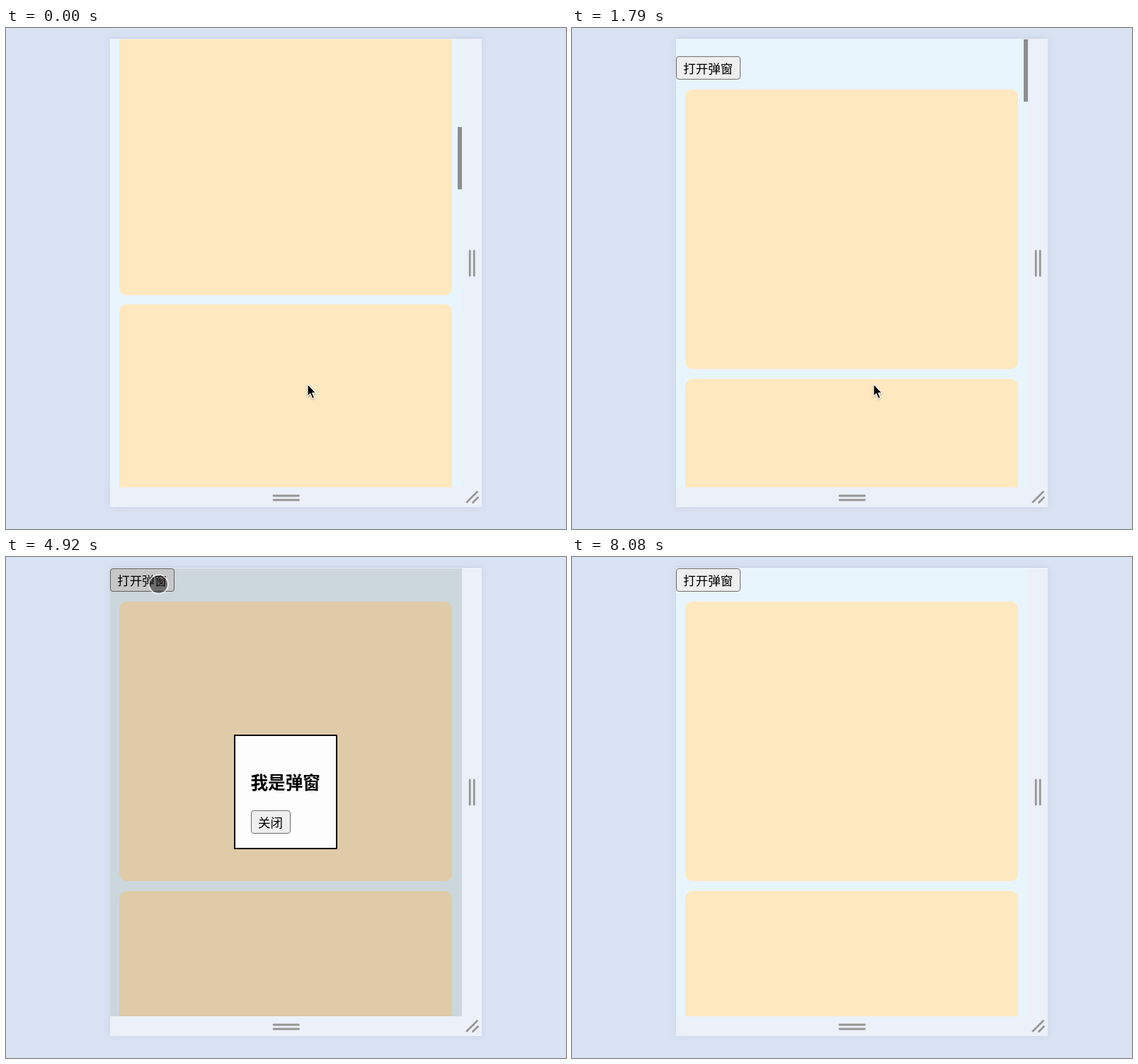
An HTML page that plays this animation: 791x708 px, repeating every 8.75 s.

```html
<!DOCTYPE html>
<html lang="zh-CN">
<head>
<meta charset="utf-8">
<title>弹窗</title>
<style>
@property --scroll { syntax: "<length>"; inherits: true; initial-value: 0px; }
* { box-sizing: border-box; }
html, body { margin: 0; width: 100%; height: 100%; overflow: hidden; background: #dae3f3; }
body { position: relative; font-family: "Noto Sans CJK SC", "Noto Sans CJK", sans-serif; color: #000; }
body *, .toggle { animation-duration: 8.75s; animation-iteration-count: infinite; }
.panel, .view, .page, .card, .btn, .thumb, .shade, .dialog, .title, .cursor, .dot, .arrow, .grips { position: absolute; }

.panel { left: 146.5px; top: 15px; width: 525.5px; height: 662px; background: #ecf0f8; box-shadow: 0 0 12px rgba(70, 90, 130, .1), 0 -1px 0 rgba(100, 110, 130, .12); }
.view { left: 146.5px; top: 15.5px; width: 497px; height: 633px; overflow: hidden; background: #e9f5fc; animation-name: scroll; }
.page { inset: 0; transform: translateY(calc(var(--scroll) * -1)); }
.card { left: 13.2px; width: 470.5px; height: 395.4px; top: calc(47.5px + 408.6px * var(--i)); border-radius: 10.5px; background: #fee8bf; }
.btn { display: flex; align-items: center; justify-content: center; height: 33px; font-size: 17.5px; line-height: 1; white-space: nowrap; background: #efefef; border: 1.4px solid #6c6c6c; border-radius: 4px; }
.open { left: 0; top: .5px; width: 91.5px; animation: hover step-end; }
.thumb { right: 0; top: .5px; width: 5.5px; height: 88px; background: #8e8e8e; transform: translateY(max(0px, var(--scroll) * .138)); animation-name: bar; }
.shade { inset: 0; background: rgba(0, 0, 0, .12); }
.dialog { left: 322px; top: 251px; width: 145.5px; height: 162px; background: #fdfdfd; border: 2px solid #000; }
.shade, .dialog { animation: popup step-end; }
.title { left: 21.5px; top: 51px; margin: 0; font-size: 24.6px; line-height: 26px; font-weight: 700; white-space: nowrap; }
.close { left: 21.5px; top: 105px; width: 56px; height: 32.5px; }
.grips { left: 0; top: 0; fill: none; stroke: #969696; stroke-width: 2.8; stroke-linecap: round; }

.cursor { left: 0; top: 0; animation: move ease-in-out; }
.dot { left: -12.5px; top: -12.5px; width: 25px; height: 25px; border-radius: 50%; background: rgba(20, 20, 20, .5); box-shadow: 0 0 0 1.8px rgba(255, 255, 255, .7); animation: touch step-end; }
.arrow { left: -2px; top: -2px; overflow: visible; filter: drop-shadow(0 1px 1px rgba(0, 0, 0, .3)); animation: mouse step-end; }
.open, .shade, .dialog, .cursor, .dot, .arrow { animation-duration: 8.75s; animation-iteration-count: infinite; }

@keyframes scroll {
  0%, .4% { --scroll: 898.5px; animation-timing-function: cubic-bezier(.3, .3, .6, 1); }
  10.2% { --scroll: 50px; animation-timing-function: linear; }
  11.4% { --scroll: 0px; animation-timing-function: ease-out; }
  12.8% { --scroll: -36px; }
  14.29% { --scroll: -32px; animation-timing-function: linear; }
  25.71% { --scroll: -17px; animation-timing-function: ease-out; }
  30.3%, 79.4% { --scroll: 0px; animation-timing-function: linear; }
  80.91% { --scroll: 76.5px; animation-timing-function: ease-out; }
  83.4% { --scroll: 210px; animation-timing-function: ease-in-out; }
  87.5%, 100% { --scroll: 0px; }
}
@keyframes bar {
  0%, 31% { opacity: 1; }
  34%, 79.4% { opacity: 0; }
  79.6%, 89.8% { opacity: 1; }
  92%, 100% { opacity: 0; }
}
@keyframes popup {
  0% { visibility: hidden; }
  35% { visibility: visible; }
  76% { visibility: hidden; }
}
@keyframes hover {
  0% { background: #efefef; }
  34% { background: #e3e3e3; }
  76% { background: #efefef; }
}
@keyframes move {
  0%, 31% { transform: translate(427px, 504px); }
  34.2%, 56.2% { transform: translate(215px, 38px); }
  65.5%, 68.6% { transform: translate(403px, 317px); }
  74%, 77% { transform: translate(373px, 374px); }
  79.4%, 85.7% { transform: translate(375.5px, 382.5px); }
  89.5% { transform: translate(750px, 330px); animation-timing-function: linear; }
  92.2%, 100% { transform: translate(805px, 315px); }
}
@keyframes touch {
  0% { visibility: hidden; }
  31% { visibility: visible; }
  88.1% { visibility: hidden; }
}
@keyframes mouse {
  0% { visibility: visible; }
  31% { visibility: hidden; }
  88.1% { visibility: visible; }
  92.2% { visibility: hidden; }
}
</style>
</head>
<body>
<div class="panel"></div>
<div class="view">
  <div class="page">
    <div class="btn open">打开弹窗</div>
    <div class="card" style="--i:0"></div>
    <div class="card" style="--i:1"></div>
    <div class="card" style="--i:2"></div>
    <div class="card" style="--i:3"></div>
    <div class="card" style="--i:4"></div>
  </div>
  <div class="thumb"></div>
  <div class="shade"></div>
</div>
<div class="dialog">
  <h3 class="title">我是弹窗</h3>
  <div class="btn close">关闭</div>
</div>
<svg class="grips" width="791" height="708">
  <path d="M655.2 315V350M661.2 315V350M378 661H413.5M378 667H413.5M651 670L665.5 655.5M659.5 670.5L666.5 663.5"/>
</svg>
<div class="cursor">
  <div class="dot"></div>
  <svg class="arrow" width="16" height="26" viewBox="-1 -1 16 26">
    <path d="M0 0V17.5L3.8 13.9L6.7 20.8L9.6 19.6L6.8 12.8H12Z" fill="#000" stroke="#fff" stroke-width="1.2"/>
  </svg>
</div>
</body>
</html>
```
